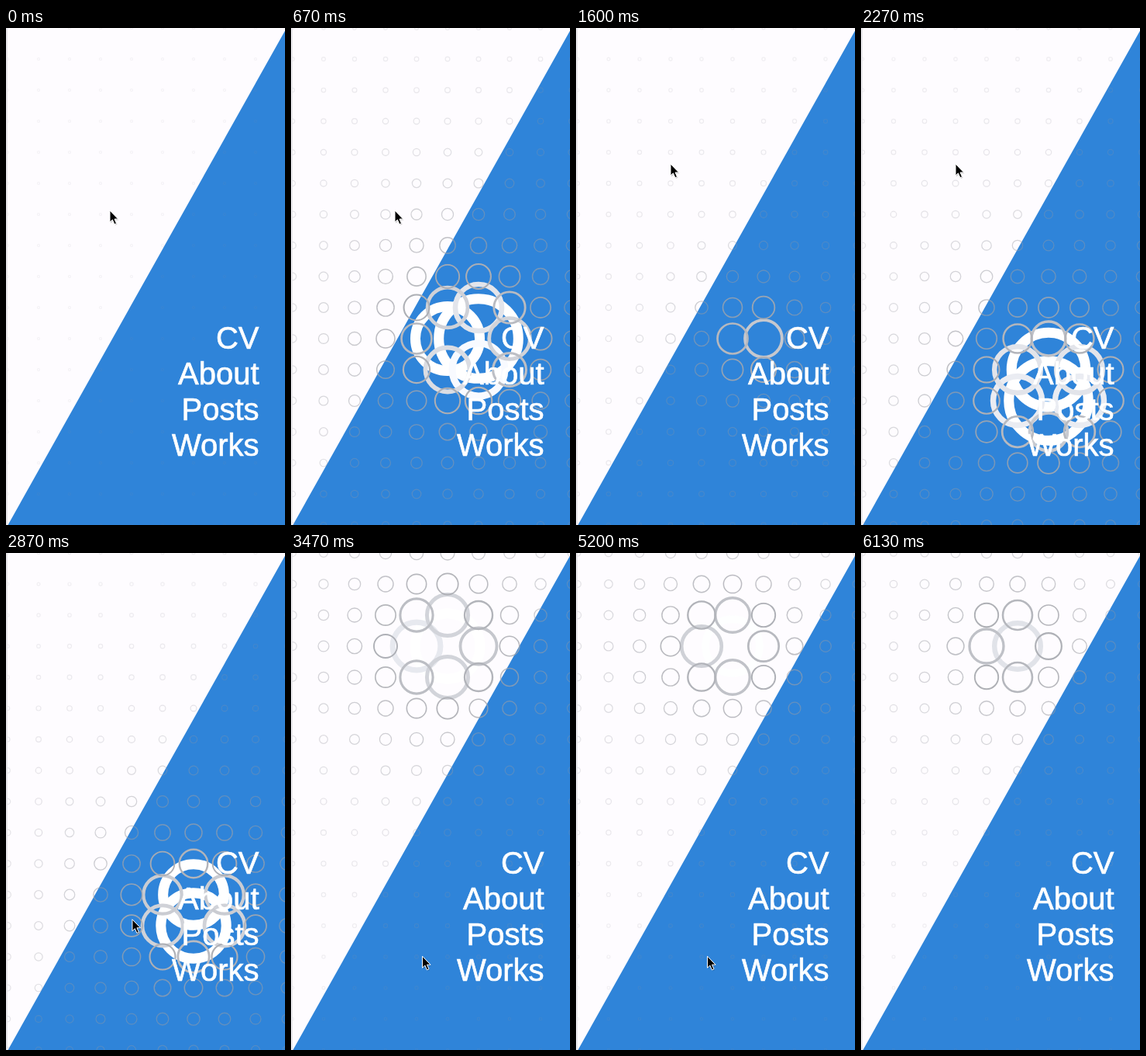
Animation, 360 px wide and 640 px high, one loop 6.19 s. Source, as an HTML page:

```html
<!DOCTYPE html>
<html lang="en">
<head>
<meta charset="utf-8">
<title>Spring rings</title>
<style>
  html, body { margin: 0; width: 100%; height: 100%; overflow: hidden; background: #fefcff; }
  svg { display: block; width: 360px; height: 640px; }
  text { font: 40px "Liberation Sans", Arial, sans-serif; fill: #fff; stroke: #fff; stroke-width: .7px; text-anchor: end; }
</style>
</head>
<body>
<svg viewBox="0 0 360 640" xmlns="http://www.w3.org/2000/svg">
  <defs>
    <clipPath id="page"><rect x="2" width="358" height="640"/></clipPath>
  </defs>
  <rect width="360" height="640" fill="#fefcff"/>
  <rect width="2" height="640" fill="#e6e5e9"/>
  <path d="M362 0V640H2.5Z" fill="#2f84d9"/>
  <g id="rings" fill="none" clip-path="url(#page)"></g>
  <text x="326.5" y="413">CV</text>
  <text x="326.5" y="459">About</text>
  <text x="326.5" y="505">Posts</text>
  <text x="326.5" y="551">Works</text>
  <g id="cursor">
    <path d="M1 2V16.5L4.4 13.4L7 19L9.6 17.8L7.1 12.5H11.5Z" fill="#000" opacity=".18"/>
    <path d="M0 0V15L3.4 11.9L5.9 17.7L8.5 16.6L6 11H10.6Z" fill="#000" stroke="#fff"/>
  </g>
</svg>
<script>
const LOOP = 6190, STEP = 1000 / 15;
const GRID = 40, REST = 1.5;
const DAMPING = 0.92, FREQ = 10.5;

// Each pulse springs the rings from rest to sizes set by its focus.
const pulses = [
  { at: 328, x: 231, y: 403 },
  { at: 1950, x: 242, y: 463 },
  { at: 3063, x: 195.5, y: 120 }
];
const stops = [
  { from: 0, to: 0, x: 134, y: 235 },
  { from: 1270, to: 1500, x: 122, y: 175 },
  { from: 2560, to: 2960, x: 169.5, y: 519.2 }
];
const CURSOR_GONE = 5580;

const ringLayer = document.getElementById("rings");
const cursor = document.getElementById("cursor");

function targetRadius(x, y, focus) {
  const d = Math.hypot(x - focus.x, y - focus.y);
  return 840 / Math.pow(d ** 4 + 27 ** 4, 1 / 4);
}

function spring(ms) {
  const s = ms / 1000, p = FREQ * s;
  return 1 - Math.exp(-DAMPING * s) * (Math.cos(p) + DAMPING / FREQ * Math.sin(p));
}

const rings = [];
for (let x = 2; x <= 362; x += GRID) {
  for (let y = 0; y <= 640; y += GRID) {
    const node = document.createElementNS("http://www.w3.org/2000/svg", "circle");
    node.setAttribute("cx", x);
    node.setAttribute("cy", y);
    rings.push({ node, x, y, r: REST });
  }
}

function drawRing({ node, r }) {
  const c = Math.min(255, Math.round(150 + 0.085 * r * r));
  node.setAttribute("r", r.toFixed(2));
  node.setAttribute("stroke", `rgb(${c},${Math.min(255, c + 2)},${Math.min(255, c + 8)})`);
  node.setAttribute("stroke-opacity", Math.min(1, r / 16).toFixed(3));
  node.setAttribute("stroke-width", Math.min(13, 1.2 + r ** 3 / 5000).toFixed(2));
}

function drawCursor(t) {
  let { x, y } = stops[0];
  for (const s of stops.slice(1)) {
    const p = Math.max(0, Math.min(1, (t - s.from) / (s.to - s.from)));
    const ease = p * p * (3 - 2 * p);
    x += (s.x - x) * ease;
    y += (s.y - y) * ease;
  }
  cursor.setAttribute("transform", `translate(${x.toFixed(2)} ${y.toFixed(2)})`);
  cursor.setAttribute("visibility", t < CURSOR_GONE ? "visible" : "hidden");
}

function draw(t) {
  const pulse = pulses.filter(p => p.at <= t).pop();
  const e = pulse ? spring(t - pulse.at) : 0;
  for (const ring of rings) {
    ring.r = pulse ? REST + (targetRadius(ring.x, ring.y, pulse) - REST) * e : REST;
    drawRing(ring);
  }
  // Small rings lie on top of large ones.
  rings.sort((a, b) => b.r - a.r);
  ringLayer.append(...rings.map(ring => ring.node));
  drawCursor(t);
}

const start = performance.now();
let shown = -1;
function tick() {
  const t = (performance.now() - start) % LOOP;
  const step = Math.floor((t + 4) / STEP);
  if (step !== shown) {
    shown = step;
    draw(step * STEP);
  }
  requestAnimationFrame(tick);
}
tick();
</script>
</body>
</html>
```
